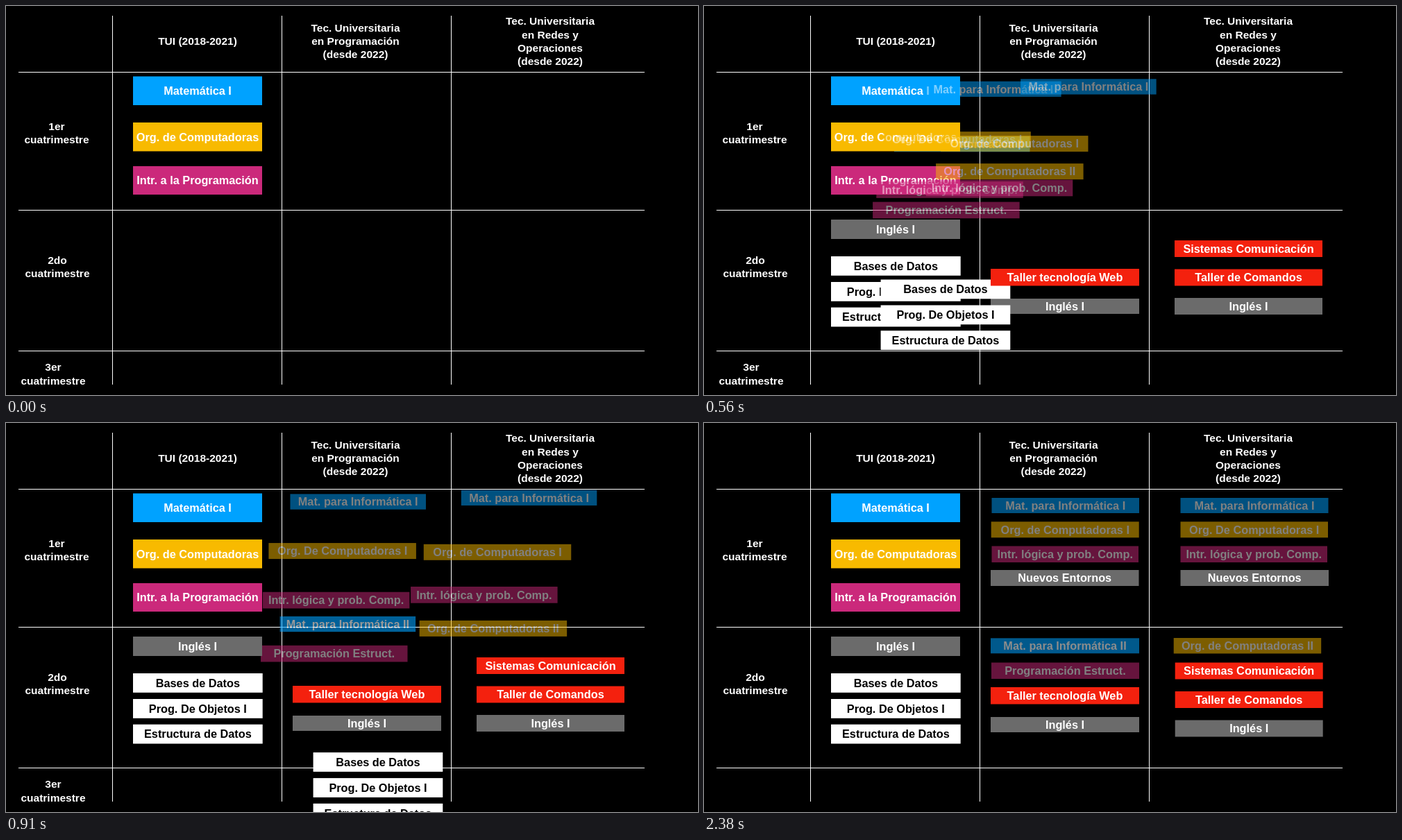
An HTML page for the animation above (3430 ms loop, 997 by 561 pixels).

```html
<!DOCTYPE html>
<html lang="es">
<head>
<meta charset="utf-8">
<title>Plan de estudios</title>
<style>
  html, body { margin: 0; width: 100%; height: 100%; overflow: hidden; background: #000; }
  svg { display: block; font: bold 16.3px "Liberation Sans", Arial, sans-serif; text-anchor: middle; }
  .head { font-size: 15.5px; fill: #fff; }
</style>
</head>
<body>
<svg id="stage" width="997" height="561" viewBox="0 0 997 561"></svg>
<script>
const LOOP = 3430, STEP = 70, FINAL = 2380;
const BLUE = '#00a2ff', YELLOW = '#f8ba00', PINK = '#cb297b';
const RED = '#f4210e', GREY = '#6b6b6b', WHITE = '#fff';

// Progress along each path at the times in KNOTS
const KNOTS = [70, 280, 560, 840, 1050, 1330];
const EASE = {
  early: [0, .115, .53, .909, 1, 1],
  midFast: [0, .017, .335, .778, .969, 1],
  mid: [0, .02, .315, .76, .96, 1],
  midSlow: [0, .02, .301, .744, .955, 1],
  late: [0, .01, .27, .712, .94, 1],
  later: [0, .01, .257, .7, .935, 1],
  last: [0, .018, .2, .622, .89, 1]
};

// Monotone cubic interpolation with flat ends
function progress(values, t) {
  const end = KNOTS.length - 1;
  if (t <= KNOTS[0]) return 0;
  if (t >= KNOTS[end]) return 1;
  const slope = i => (values[i + 1] - values[i]) / (KNOTS[i + 1] - KNOTS[i]);
  const tangent = i => {
    if (i === 0 || i === end) return 0;
    const a = slope(i - 1), b = slope(i);
    return a * b > 0 ? 2 * a * b / (a + b) : 0;
  };
  const i = KNOTS.findIndex(k => k > t) - 1;
  const h = KNOTS[i + 1] - KNOTS[i], u = (t - KNOTS[i]) / h, v = 1 - u;
  return values[i] * v * v * (1 + 2 * u) + values[i + 1] * u * u * (3 - 2 * u)
    + h * u * v * (tangent(i) * v - tangent(i + 1) * u);
}

const label = (text, x, y, cls = '', fill = WHITE) =>
  `<text class="${cls}" x="${x}" y="${y + 5.8}" fill="${fill}">${text}</text>`;

const box = (text, color, x, y, w, h, opacity = 1) =>
  `<g opacity="${opacity}"><rect x="${x}" y="${y}" width="${w}" height="${h}" fill="${color}"/>` +
  label(text, x + w / 2, y + h / 2, '', color === WHITE ? '#000' : WHITE) + '</g>';

const all = list => list.map(args => box(...args)).join('');

const lines = (x, y, texts) => texts.map((s, i) => label(s, x, y + i * 19.2, 'head')).join('');

const grid = '<path stroke="#fff" d="M153.5 14V546M397.5 14V546M641.5 14V546' +
  'M18 95.5H920M18 294.5H920M18 497.5H920"/>' +
  lines(276, 50, ['TUI (2018-2021)']) +
  lines(503.5, 31, ['Tec. Universitaria', 'en Programación', '(desde 2022)']) +
  lines(784, 21.5, ['Tec. Universitaria', 'en Redes y', 'Operaciones', '(desde 2022)']) +
  lines(73, 173, ['1er', 'cuatrimestre']) +
  lines(74, 366, ['2do', 'cuatrimestre']);
const thirdRow = lines(68, 520.5, ['3er', 'cuatrimestre']);

const maths = all([['Matemática I', BLUE, 183, 101.5, 186, 41.5]]);
const computing = all([
  ['Org. de Computadoras', YELLOW, 183, 168, 186, 41.5],
  ['Intr. a la Programación', PINK, 183, 231, 186, 41]
]);

const whites = [['Bases de Datos', 361], ['Prog. De Objetos I', 398], ['Estructura de Datos', 434.7]];
const whiteRow = (dx, dy) => all(whites.map(([s, y]) => [s, WHITE, 183 + dx, y + dy, 186.7, 27.8]));

const english = all([['Inglés I', GREY, 183, 308, 186, 28]]);
const newEnglish = all([
  ['Inglés I', GREY, 413, 422, 214, 22],
  ['Inglés I', GREY, 678, 421, 213, 24]
]);
const newCourses = all([
  ['Taller tecnología Web', RED, 413, 379, 214, 24.5],
  ['Sistemas Comunicación', RED, 678, 338, 213, 24],
  ['Taller de Comandos', RED, 678, 379.5, 213, 24]
]);

// text, colour, width, height, from x, y, to x, y, ease, opacity
const mathMovers = [
  ['Mat. para Informática I', BLUE, 195.5, 22.3, 206, 116.5, 419.5, 101.7, 'early'],
  ['Mat. para Informática I', BLUE, 195.5, 22.3, 206, 116, 678, 95.7, 'early'],
  ['Mat. para Informática II', BLUE, 195.5, 22.3, 197, 130, 426.7, 303, 'midFast', .6]
];
const computingMovers = [
  ['Org. De Computadoras I', YELLOW, 212.5, 23, 187, 186, 413.5, 170.7, 'mid'],
  ['Org. de Computadoras I', YELLOW, 212.5, 23, 186, 194.4, 678, 171.2, 'mid'],
  ['Org. de Computadoras II', YELLOW, 212.5, 23, 186, 194.5, 678, 303, 'midSlow'],
  ['Intr. lógica y prob. Comp.', PINK, 211.5, 23.7, 187, 258, 414, 240.3, 'late'],
  ['Intr. lógica y prob. Comp.', PINK, 211.5, 23.7, 187, 258, 678.7, 230.7, 'late'],
  ['Programación Estruct.', PINK, 211.5, 23.7, 184, 264.3, 414, 335.3, 'later']
];

const move = (movers, t) => all(movers.map(([s, color, w, h, x0, y0, x1, y1, ease, opacity = .5]) => {
  const p = progress(EASE[ease], t);
  return [s, color, x0 + (x1 - x0) * p, y0 + (y1 - y0) * p, w, h, opacity];
}));

const finalPlan = all([
  ['Mat. para Informática I', BLUE, 414.5, 108, 212.5, 22, .5],
  ['Org. de Computadoras I', YELLOW, 413.7, 142.3, 213, 23, .5],
  ['Intr. lógica y prob. Comp.', PINK, 414.5, 177.5, 211.5, 23.5, .5],
  ['Nuevos Entornos', GREY, 413, 212, 213.5, 23],
  ['Mat. para Informática I', BLUE, 686.5, 108, 213, 22, .5],
  ['Org. De Computadoras I', YELLOW, 686.5, 142.3, 212.5, 23, .5],
  ['Intr. lógica y prob. Comp.', PINK, 686.5, 177.5, 211.5, 23.5, .5],
  ['Nuevos Entornos', GREY, 686.5, 212, 213.5, 23],
  ['Mat. para Informática II', BLUE, 413, 310.3, 214, 22, .55],
  ['Programación Estruct.', PINK, 414, 345.5, 213, 23.5, .5],
  ['Taller tecnología Web', RED, 413, 381, 214, 24.5],
  ['Inglés I', GREY, 413, 424, 214, 22],
  ['Org. de Computadoras II', YELLOW, 676.7, 310, 212.5, 22.5, .5],
  ['Sistemas Comunicación', RED, 678.7, 345.5, 213, 24],
  ['Taller de Comandos', RED, 678.7, 387, 213, 24],
  ['Inglés I', GREY, 678.7, 428.5, 213, 24]
]);

function scene(t) {
  if (t >= FINAL) return grid + maths + computing + whiteRow(0, 0) + english + finalPlan;
  if (t < STEP) return grid + thirdRow + maths + computing;
  const p = progress(EASE.last, t);
  return grid + thirdRow + maths + move(mathMovers, t) + computing + move(computingMovers, t) +
    english + newEnglish + whiteRow(0, 0) + whiteRow(358 * p, 2.8 + 153.5 * p) + newCourses;
}

const stage = document.getElementById('stage');
let shown = -1;
function frame() {
  const t = Math.floor(performance.now() % LOOP / STEP) * STEP;
  if (t !== shown) stage.innerHTML = scene(shown = t);
  requestAnimationFrame(frame);
}
frame();
</script>
</body>
</html>
```
